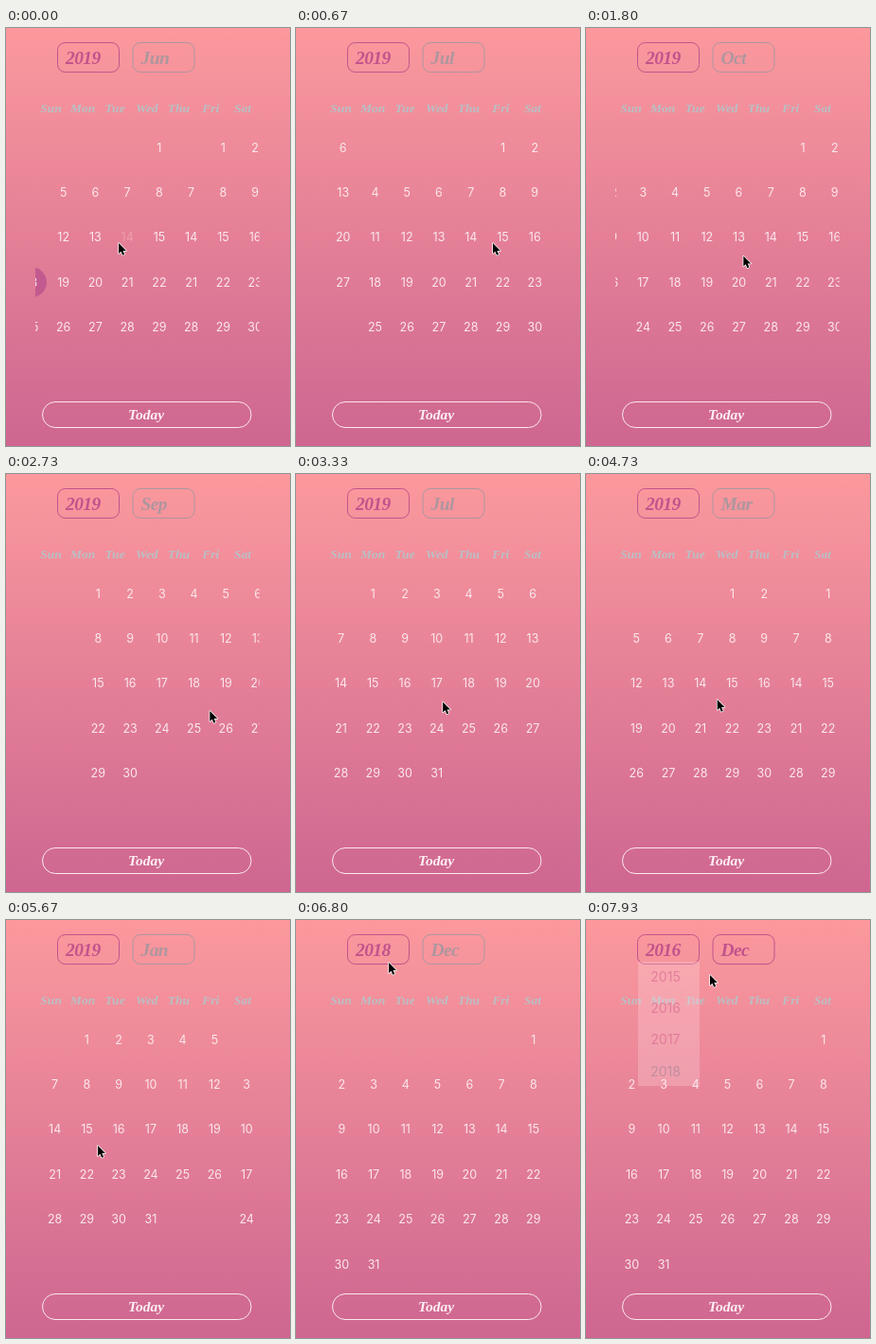
These frames come from a looping animation (300x441 px, 8 s). An HTML page with a canvas:

```html
<!DOCTYPE html>
<html lang="en">
<head>
<meta charset="utf-8">
<title>Calendar</title>
<style>
  html, body { margin: 0; width: 100%; height: 100%; overflow: hidden; background: #e47f96; }
  canvas { display: block; width: 300px; height: 441px; }
</style>
</head>
<body>
<canvas id="stage"></canvas>
<script>
const LOOP = 8000, COL = 33.75, ROW = 47.4, PAGE = COL * 7;
const DRAG = 90, SETTLE = 250, RETURN = 120;
const FORWARD = 5, SWIPES = 16, START_MONTH = 5;
const PURPLE = [193, 83, 140], GREY = [174, 150, 158];
const WHITE = '#fbe8ec', ORANGE = '#ffa000', TODAY = '#c35a8f';
const SCRIPT = '"Liberation Serif", serif', DIGITS = 'Inter, sans-serif';
const MONTHS = 'Jan Feb Mar Apr May Jun Jul Aug Sep Oct Nov Dec'.split(' ');
const DAYS = 'Sun Mon Tue Wed Thu Fri Sat'.split(' ');
const MARKS = { '4-1': '#007a00', '4-6': '#1800f5', '4-16': ORANGE, '4-17': TODAY, '5-18': TODAY };

// Pace of the hand: swipe number and its release time
const PACE = [[0, 11], [1, 548], [4, 1625], [7, 2772], [10, 3754], [14, 5535], [15, 5950]];
// Pointer stops after the last swipe: time, x, y
const STOPS = [[6200, 186, 236], [6900, 92, 33], [7450, 86, 95], [7900, 130, 57]];

const clamp = v => Math.max(0, Math.min(1, v));
const mix = (a, b, u) => a + (b - a) * u;
const smooth = u => u * u * (3 - 2 * u);
const ramp = (t, start, end) => clamp((t - start) / (end - start));
const blend = (a, b, u) => `rgb(${a.map((v, i) => Math.round(mix(v, b[i], u)))})`;

// Interpolates rows of [position, ...values]
function along(rows, at, ease = u => u) {
  const i = Math.max(1, rows.findIndex(r => r[0] >= at));
  const a = rows[i - 1], b = rows[i];
  const u = ease(ramp(at, a[0], b[0]));
  return a.slice(1).map((v, k) => mix(v, b[k + 1], u));
}

const swipes = Array.from({ length: SWIPES }, (_, i) => {
  const dir = i < FORWARD ? 1 : -1;
  const [release] = along(PACE, i);
  return {
    dir, release, press: release - DRAG,
    reach: dir > 0 ? 100 : 90,
    from: START_MONTH + FORWARD - Math.abs(FORWARD - i),
    x: dir > 0 ? 207 : 168 - 72 * (Math.abs(i - 6) / 9) ** 1.5,
    y: dir > 0 ? 226 : 237 + 12 * Math.exp(-(((i - 7) / 1.6) ** 2))
  };
});

const canvas = document.getElementById('stage');
const ctx = canvas.getContext('2d');
const scale = window.devicePixelRatio || 1;
canvas.width = 300 * scale;
canvas.height = 441 * scale;

function text(str, x, y, font, color, align = 'center') {
  ctx.font = font;
  ctx.fillStyle = color;
  ctx.textAlign = align;
  ctx.fillText(str, x, y);
}

function outline(x, y, w, h, r, color) {
  ctx.beginPath();
  ctx.roundRect(x, y, w, h, r);
  ctx.strokeStyle = color;
  ctx.lineWidth = 1;
  ctx.stroke();
}

function swipeAt(t) {
  return Math.max(0, swipes.findLastIndex(s => t >= s.press));
}

// The earlier page arrives only once a backward drag is released
function carousel(t) {
  const s = swipes[swipeAt(t)];
  if (t < s.release) {
    const shift = -s.dir * s.reach * ramp(t, s.press, s.release);
    return { left: s.from, label: s.from, shift, pair: s.dir > 0, held: s };
  }
  const u = ramp(t, s.release, s.release + SETTLE);
  const rest = (PAGE - s.reach) * (1 - u) ** 2;
  const left = s.dir > 0 ? s.from : s.from - 1;
  const done = s.dir > 0 && u === 1;
  return { left, label: left + done, shift: s.dir > 0 ? rest - PAGE : -rest, pair: true };
}

function pointer(t) {
  if (t > STOPS[0][0]) return along(STOPS, Math.min(t, STOPS.at(-1)[0]), smooth);
  const i = swipeAt(t), s = swipes[i];
  const endX = s.x - s.dir * s.reach;
  const next = swipes[i + 1] || { x: endX, y: s.y };
  if (t < s.release) return [mix(s.x, endX, ramp(t, s.press, s.release)), s.y];
  const u = smooth(ramp(t, s.release, s.release + RETURN));
  return [mix(endX, next.x, u), mix(s.y, next.y, u)];
}

function drawMonth(index, shift, held) {
  const first = new Date(2019, index, 1).getDay();
  const count = new Date(2019, index + 1, 0).getDate();
  for (let day = 1; day <= count; day++) {
    const cell = day - 1 + first;
    const home = 48.3 + cell % 7 * COL, x = home + shift;
    const y = 126 + Math.floor(cell / 7) * ROW;
    const mark = MARKS[index + '-' + day];
    if (mark) {
      ctx.beginPath();
      ctx.arc(x, y, 16, 0, 7);
      ctx.fillStyle = mark;
      ctx.fill();
    }
    const pressed = held && Math.hypot(home - held.x, y - held.y) < 16;
    const color = pressed ? '#ee9dad' : mark === ORANGE ? '#f5d2ac' : WHITE;
    text(day, x, y + 4.6, '12.5px ' + DIGITS, color);
  }
}

function drawField(x, label, color) {
  outline(x, 15.5, 65, 31, 8, color);
  ctx.letterSpacing = '-0.6px';
  text(label, x + 8.5, 38, 'italic bold 19.5px ' + SCRIPT, color, 'left');
  ctx.letterSpacing = '0px';
}

function drawYears(t) {
  ctx.globalAlpha = ramp(t, 7000, 7200) * (1 - ramp(t, 7760, 8120));
  ctx.fillStyle = 'rgba(255,225,232,.5)';
  ctx.fillRect(55, 44, 65, 131);
  for (let i = 0; i < 4; i++) {
    text(2015 + i, 84, 65 + i * 33.2, '14px ' + DIGITS, i === 3 ? '#95808f' : '#cf5789');
  }
  ctx.globalAlpha = 1;
}

function drawPointer([x, y]) {
  ctx.save();
  ctx.translate(x + 1, y + 1);
  ctx.scale(.82, .82);
  const arrow = new Path2D('M0 0V13.5L3 10.7 5 15.5 7.4 14.5 5.4 9.8H9.6Z');
  ctx.strokeStyle = '#fff';
  ctx.lineWidth = 1.8;
  ctx.lineJoin = 'round';
  ctx.stroke(arrow);
  ctx.fillStyle = '#000';
  ctx.fill(arrow);
  ctx.restore();
}

function draw(t) {
  ctx.setTransform(scale, 0, 0, scale, 0, 0);
  const sky = ctx.createLinearGradient(0, 0, 0, 441);
  sky.addColorStop(0, '#fb999d');
  sky.addColorStop(1, '#ce6691');
  ctx.fillStyle = sky;
  ctx.fillRect(0, 0, 300, 441);

  const view = carousel(t);
  const year = t >= 7600 ? 2016 : view.label < 0 ? 2018 : 2019;
  drawField(54.5, year, blend(PURPLE, PURPLE, 1));
  drawField(134, MONTHS[(view.label + 12) % 12], blend(GREY, PURPLE, ramp(t, 7050, 7350)));
  DAYS.forEach((name, i) =>
    text(name, 47.5 + i * COL, 89, 'italic bold 13.5px ' + SCRIPT, '#b9bfc5'));

  drawYears(t);
  ctx.save();
  ctx.beginPath();
  ctx.rect(31, 100, 236.5, 290);
  ctx.clip();
  drawMonth(view.left, view.shift, view.held);
  if (view.pair) drawMonth(view.left + 1, view.shift + PAGE);
  ctx.restore();

  outline(38.5, 394.5, 220.5, 27, 13.5, WHITE);
  text('Today', 148, 413, 'italic bold 15.5px ' + SCRIPT, '#fff0f4');
  drawPointer(pointer(t));
}

const begin = performance.now();
function tick() {
  draw((performance.now() - begin) % LOOP);
  requestAnimationFrame(tick);
}
tick();
</script>
</body>
</html>
```
